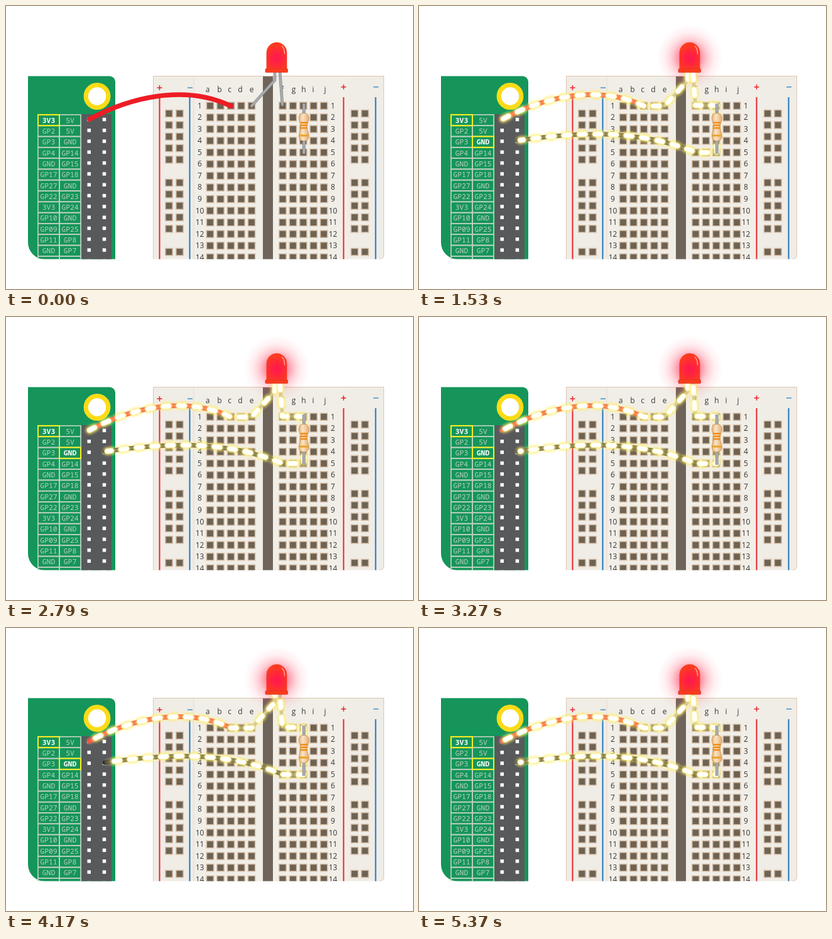
An HTML page that plays this animation: 648x450 px, repeating every 5.43 s.

```html
<!DOCTYPE html>
<html lang="en">
<head>
<meta charset="utf-8">
<title>LED circuit</title>
<style>
  html, body { margin: 0; width: 100%; height: 100%; overflow: hidden; background: #fff; }
  svg { display: block; width: 648px; height: 450px; }
  .pin { font: 11.3px "Noto Sans Mono", "DejaVu Sans Mono", monospace; fill: #bdd0bf; text-anchor: middle; }
  .hot { font-weight: 700; fill: #fff; }
  .mark { font: 12px "Open Sans", "Noto Sans", sans-serif; fill: #363637; text-anchor: middle; }
  .hole { fill: #6e6252; stroke: #d2bba4; stroke-width: 1.5; }
  .line { fill: none; stroke-linecap: round; stroke-linejoin: round; }
</style>
</head>
<body>
<svg viewBox="0 0 648 450">
  <defs>
    <clipPath id="crop"><rect width="648" height="402.6"/></clipPath>
    <clipPath id="boardEdge"><path d="M234 111H602V396Q602 403 594 403H234Z"/></clipPath>
    <radialGradient id="bulb" gradientUnits="userSpaceOnUse" cx="431" cy="83" r="21">
      <stop offset="0" stop-color="#ff1850"/><stop offset=".4" stop-color="#ff2341"/><stop offset="1" stop-color="#ff3b1f"/>
    </radialGradient>
    <radialGradient id="halo">
      <stop offset="0" stop-color="#ff2044" stop-opacity=".8"/>
      <stop offset=".32" stop-color="#ff2044" stop-opacity=".5"/>
      <stop offset=".55" stop-color="#ff2a4c" stop-opacity=".22"/>
      <stop offset=".75" stop-color="#ff3c5c" stop-opacity=".08"/>
      <stop offset="1" stop-color="#ff5070" stop-opacity="0"/>
    </radialGradient>
    <linearGradient id="body">
      <stop offset="0" stop-color="#e9b67c"/><stop offset=".4" stop-color="#fae3c4"/><stop offset="1" stop-color="#e6ad72"/>
    </linearGradient>
    <filter id="soft" filterUnits="userSpaceOnUse" x="100" y="80" width="420" height="180"><feGaussianBlur stdDeviation="2"/></filter>
  </defs>

  <g clip-path="url(#crop)">
    <path d="M35 111.5H165A9 9 0 0 1 174 120.5V403H62A27 27 0 0 1 35 376Z" fill="#15955a"/>
    <circle cx="145" cy="143.5" r="17.8" fill="#fff" stroke="#fcdb17" stroke-width="7.2"/>
    <rect x="120.5" y="172" width="47.5" height="232" fill="#58595b"/>
    <g id="header"></g>
    <g clip-path="url(#boardEdge)">
      <rect x="234" y="111" width="369" height="293" fill="#f0ece6"/>
      <rect x="299" y="111" width="246" height="293" fill="#f1eee7"/>
      <path d="M299 112V403" stroke="#e6ddd2"/>
      <rect x="409" y="111" width="16" height="293" fill="#6e6459"/>
      <g id="breadboard"></g>
    </g>
    <path d="M234.5 403V111.5H601.5V396Q601.5 402 594 402.4" fill="none" stroke="#dcc5b0"/>
  </g>

  <path class="line" d="M133 180C198 145 285 124 358 159" stroke="#ee1c25" stroke-width="7.5"/>
  <path id="wire" class="line" d="M441 233C345 194 250 201 157 214" pathLength="1" stroke="#231f20" stroke-width="7"/>

  <g class="line">
    <path d="M428 104V118L391 159M436 104L440 157" stroke="#85878a" stroke-width="4.6"/>
    <path d="M428 104V118L391 159M436 104L440 157" stroke="#abadb0" stroke-width="3"/>
  </g>

  <g id="live">
    <circle cx="431" cy="82" r="53" fill="url(#halo)"/>
    <g id="flow"></g>
    <rect x="85" y="207.5" width="34" height="17.3" fill="#15955a" stroke="#fcee21" stroke-width="2"/>
    <text class="pin hot" x="102" y="220.3">GND</text>
  </g>

  <g>
    <path d="M474.3 155V172M474.3 213V235" stroke="#8c8e91" stroke-width="5"/>
    <path d="M474.3 155V172M474.3 213V235" stroke="#abadb0" stroke-width="3"/>
    <path d="M474.3 170.5C480 170.5 482.2 174 482.2 178.5C482.2 184 479.5 185 479.5 192.5C479.5 200 482.2 201 482.2 206.5C482.2 211 480 214.5 474.3 214.5C468.5 214.5 466.4 211 466.4 206.5C466.4 201 469 200 469 192.5C469 185 466.4 184 466.4 178.5C466.4 174 468.5 170.5 474.3 170.5Z" fill="url(#body)" stroke="#c99560"/>
    <path d="M468.5 185.6H480M469.2 189.8H479.4M469.2 194H479.4" stroke="#f18b16" stroke-width="2.5"/>
    <path d="M467 206H481.6" stroke="#e9a42a" stroke-width="3"/>
  </g>
  <path d="M415 101V74A16 16 0 0 1 447 74V101Z" fill="url(#bulb)" stroke="#ec3a22" stroke-width=".8"/>
  <path class="line" d="M439.5 64Q443.6 68 443.6 76" stroke="#fff" stroke-width="1.6" opacity=".5"/>
  <rect x="413" y="100" width="35.5" height="5.6" rx="1" fill="#fb3b1e" stroke="#d8341f" stroke-width=".8"/>
</svg>

<script>
const NS = "http://www.w3.org/2000/svg";
const $ = id => document.getElementById(id);

function add(parent, tag, attrs, text) {
  const el = document.createElementNS(NS, tag);
  for (const k in attrs) el.setAttribute(k, attrs[k]);
  if (text !== undefined) el.textContent = text;
  parent.appendChild(el);
  return el;
}

function drawHeader(g) {
  const left = "3V3 GP2 GP3 GP4 GND GP17 GP27 GP22 3V3 GP10 GP09 GP11 GND DNC".split(" ");
  const right = "5V 5V GND GP14 GP15 GP18 GND GP23 GP24 GND GP25 GP8 GP7 DNC".split(" ");
  const top = 172.9, pitch = 17.3;
  const cell = (col, y, stroke, width) =>
    add(g, "rect", { x: 51 + 34 * col, y, width: 34, height: pitch, fill: "none", stroke, "stroke-width": width });

  left.forEach((name, i) => {
    const y = top + pitch * i;
    [name, right[i]].forEach((label, col) => {
      cell(col, y, "#bdd0bf", 1.7);
      add(g, "text", { x: 68 + 34 * col, y: y + 12.8, class: i + col ? "pin" : "pin hot" }, label);
      add(g, "rect", { x: 129.5 + 24.2 * col, y: y + 4.8, width: 5.5, height: 5.5, fill: "#fff" });
    });
  });
  cell(0, top, "#fcee21", 2);
}

function drawBreadboard(g) {
  const hole = (x, y) => add(g, "rect", { x: x - 5.6, y: y - 5.6, width: 11.2, height: 11.2, class: "hole" });
  const mark = (x, y, s) => add(g, "text", { x, y, class: "mark" }, s);
  const stroke = (d, color, width) => add(g, "path", { d, stroke: color, "stroke-width": width });
  const red = "#e8232b", blue = "#1b75bc";

  stroke("M244.5 145V403M537.5 145V403", red, 2);
  stroke("M292.5 145V403M588.5 145V403", blue, 2);
  stroke("M240.5 130H248.5M244.5 126V134M533.5 128.7H541.5M537.5 124.7V132.7", red, 1.5);
  stroke("M289 130H297M585 128.7H593", "#3b95d0", 1.5);

  for (let i = 0; i < 13; i++) {
    if (i % 6 === 5) continue;
    for (const x of [259.5, 276.5, 555, 571.5]) hole(x, 171 + 18.33 * i);
  }
  for (let r = 0; r < 14; r++) {
    const y = 158.7 + 18.54 * r;
    for (let c = 0; c < 5; c++) {
      hole(325 + 16.5 * c, y);
      hole(440.5 + 16.4 * c, y);
    }
    mark(308.5, y + 4, r + 1);
    mark(520.5, y + 4, r + 1);
  }
  const cols = [321, 340, 356, 373, 391, 440, 458, 474, 489, 508];
  cols.forEach((x, i) => mark(x, 136.5, "abcdefghij"[i]));
}

// Current: dashes running from the supply pin to ground, through the LED
const GAP = 24.8, DASH = 9.5;
const routes = [
  { d: "M133 180C198 145 285 124 358 159H391L428 118V105", start: 9.5, dir: 1 },
  { d: "M161 213.5C252 201 345 194 441 233H474V158H440L436 105", start: -3, dir: -1 }
];

function drawFlow(g) {
  const layers = [
    { stroke: "#ffee62", "stroke-width": 12, opacity: .8, filter: "url(#soft)" },
    { stroke: "#fffac0", "stroke-width": 8.4 },
    { stroke: "#ffffff", "stroke-width": 6.4 }
  ];
  for (const route of routes) {
    add(g, "path", { d: route.d, class: "line", stroke: "#fff0a8", "stroke-width": 9, opacity: .32, filter: "url(#soft)" });
    route.paths = layers.map(style =>
      add(g, "path", { d: route.d, class: "line", "stroke-dasharray": `${DASH} ${GAP - DASH}`, ...style }));
  }
}

const LOOP = 5430, TICK = 30;
const WIRE_FROM = 14, WIRE_STEPS = 14, LIVE_FROM = 31, RATE = 0.1695;

function render(ms) {
  // Five picture steps for every six ticks
  const tick = Math.floor((ms % LOOP) / TICK);
  const n = Math.floor(5 * (tick + 1) / 6);

  const grown = Math.min(1, Math.max(0, (n - WIRE_FROM) / WIRE_STEPS));
  const wire = $("wire");
  wire.style.display = grown ? "" : "none";
  wire.setAttribute("stroke-dasharray", `${grown} 2`);

  $("live").style.display = n >= LIVE_FROM ? "" : "none";
  const shift = (n - 91) * RATE * GAP;
  for (const { paths, start, dir } of routes) {
    const offset = (DASH / 2 - start - dir * shift) % GAP;
    for (const p of paths) p.setAttribute("stroke-dashoffset", offset.toFixed(2));
  }
}

drawHeader($("header"));
drawBreadboard($("breadboard"));
drawFlow($("flow"));

function loop() {
  render(performance.now());
  requestAnimationFrame(loop);
}
loop();
</script>
</body>
</html>
```
